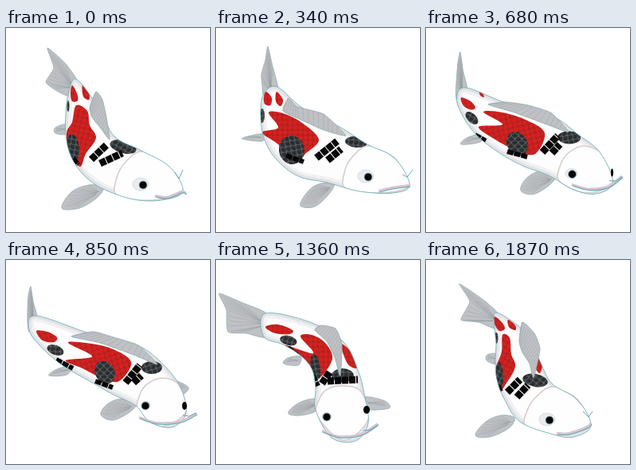
These frames come from a looping animation (256 px wide and 256 px high, 2040 ms). An HTML page:

```html
<!DOCTYPE html>
<html lang="en">
<head>
<meta charset="utf-8">
<title>Koi</title>
<style>
html, body { margin: 0; width: 100%; height: 100%; overflow: hidden; background: #fff; }
svg { display: block; width: 100vw; height: 100vh; }
path { stroke-linejoin: round; }
.line { fill: none; }
</style>
</head>
<body>
<svg id="stage" viewBox="0 0 256 256">
  <defs>
    <clipPath id="skin"><path id="skinPath"/></clipPath>
    <pattern id="redNet" width="9" height="9" patternUnits="userSpaceOnUse">
      <rect width="9" height="9" fill="#d5211f"/>
      <path d="M0 0Q1 4.5 4.5 4.5Q8 4.5 9 0M-4.5 4.5Q-3.5 9 0 9Q3.5 9 4.5 4.5Q5.5 9 9 9" fill="none" stroke="#86201f" stroke-width=".7"/>
    </pattern>
    <pattern id="darkNet" width="9" height="9" patternUnits="userSpaceOnUse">
      <rect width="9" height="9" fill="#2b2e30"/>
      <path d="M0 0Q1 4.5 4.5 4.5Q8 4.5 9 0M-4.5 4.5Q-3.5 9 0 9Q3.5 9 4.5 4.5Q5.5 9 9 9" fill="none" stroke="#73787a" stroke-width=".8"/>
    </pattern>
  </defs>
</svg>
<script>
const STEP = 170, COUNT = 12;
const KEYS = [0, 2, 3, 5, 6, 8, 11];

// Each part has one row of x y pairs per key pose.
const rows = text => text.trim().split('\n').map(r => r.trim().split(/\s+/).map(Number));
const parts = {
  left: rows(`78 84 75 108 75 135 82 162 98 185 122 202 160 215
    60 82 56 108 60 138 75 164 103 186 140 194 180 205
    48 88 48 112 57 138 80 162 112 179 145 187 190 203
    29 88 45 110 72 133 105 152 133 168 163 183 180 203
    35 90 57 112 85 130 112 147 135 163 150 180 165 210
    60 96 84 106 105 119 120 136 125 160 125 188 145 223
    86 84 88 105 87 128 89 150 98 174 118 203 160 219`),
  right: rows(`195 216 222 205 205 174 168 153 136 136 116 100 88 64
    222 207 243 197 224 163 190 146 155 124 108 100 77 74
    220 206 243 195 218 153 186 137 150 113 100 98 63 80
    208 210 226 192 219 160 198 132 165 107 105 92 38 70
    190 215 212 195 208 160 190 128 160 105 100 87 37 72
    175 227 191 205 186 168 178 138 160 103 118 78 62 67
    185 222 207 208 190 175 158 155 142 125 126 92 89 66`),
  tail: rows(`89 66 74 44 52 25 60 50 50 68 64 79 79 85
    78 78 71 48 65 23 62 40 57 58 58 72 60 84
    64 82 59 55 55 27 52 42 50 60 48 76 48 90
    39 72 34 52 31 33 28 44 27 62 27 78 29 90
    39 73 28 52 18 36 17 58 14 86 24 88 37 92
    63 67 34 54 4 42 13 62 15 90 38 92 63 97
    90 67 72 50 42 30 55 52 44 75 66 78 87 86`),
  dorsal: rows(`105 100 113 80 121 90 126 112 130 140 119 126 108 112
    84 104 91 88 102 99 135 108 163 135 135 128 104 114
    74 96 92 96 122 97 148 106 168 130 140 122 104 108
    82 96 110 90 135 97 166 107 190 131 160 119 118 104
    118 94 127 84 146 94 176 102 193 135 172 118 144 104
    124 88 132 82 150 86 158 106 156 146 149 122 139 102
    117 102 121 78 136 92 143 112 135 148 130 130 121 116`),
  pectoral: rows(`122 200 104 197 82 206 70 226 92 226 114 213
    148 194 126 197 113 208 106 223 124 224 142 208
    162 190 140 186 124 197 119 214 136 216 155 203
    163 180 145 174 127 181 119 194 134 201 155 191
    151 176 133 173 116 180 110 191 126 195 146 190
    128 175 112 176 97 184 91 193 106 195 126 189
    111 198 94 195 75 203 62 220 80 222 104 211`),
  pelvic: rows(`76 121 62 125 62 132 76 133
    59 133 44 135 33 139 58 142
    60 133 40 138 34 147 60 142
    82 133 64 137 54 145 76 144
    92 132 74 134 65 141 86 143
    106 121 90 123 85 130 103 132
    88 118 77 119 76 126 87 130`),
  farFin: rows(`185 178 190 178 192 184 185 184
    210 175 215 175 216 180 210 180
    210 172 216 172 217 178 210 178
    208 152 222 155 229 162 215 172
    203 157 230 155 232 169 210 174
    187 172 212 177 217 186 189 187
    165 180 170 180 172 185 165 185`),
  head: rows(`140 211 139 188 151 167 172 155 206 174 222 204 185 216
    163 201 161 182 170 163 192 148 226 165 243 197 205 207
    169 195 169 176 180 158 200 148 227 161 243 194 210 205
    166 190 168 169 178 155 198 148 218 158 226 190 195 209
    152 190 154 170 164 155 184 150 205 158 213 190 180 215
    127 196 130 174 140 162 160 158 182 165 191 200 160 226
    126 209 127 189 139 171 160 159 190 176 207 207 165 220`),
  redBig: rows(`88 97 102 104 105 122 113 138 100 158 93 174 80 158 76 132 83 118
    66 106 84 107 108 119 129 140 112 158 100 168 78 146 58 131 78 125
    66 107 92 108 122 121 141 136 132 164 108 160 78 144 57 122 84 121
    78 104 100 104 132 111 157 128 142 152 120 148 96 136 75 126 108 121
    91 101 108 98 138 104 158 124 143 150 124 144 100 134 70 118 110 121
    106 96 120 94 137 104 146 124 130 148 121 138 108 122 87 107 122 117
    96 94 105 98 107 118 112 134 100 156 92 165 88 150 89 132 95 115`),
  redTail: rows(`83 72 89 82 90 91 83 92 81 82
    63 80 70 88 68 97 61 95 60 86
    50 86 60 94 60 103 52 102 48 94
    38 89 52 90 64 97 60 103 46 101
    43 90 58 87 75 94 71 99 53 98
    62 84 78 81 96 88 92 93 74 92
    86 71 95 78 99 86 92 89 86 80`),
  redBack: rows(`96 72 104 82 104 90 97 86
    76 80 84 90 81 98 75 92
    64 83 73 91 74 97 66 93
    70 75 71 76 71 77 70 76
    80 73 81 74 81 75 80 74
    95 65 96 66 96 67 95 66
    103 75 112 82 112 88 104 84`),
  redFar: rows(`137 118 140 122 142 128 138 124
    200 100 202 102 202 104 200 102
    200 100 202 102 202 104 200 102
    200 100 202 102 202 104 200 102
    192 110 199 117 201 124 194 117
    157 106 170 116 177 135 165 130
    139 118 146 128 143 142 137 134`),
  scales: rows(`107 165 126 147 118 170 146 157
    126 163 152 142 140 166 157 152
    142 158 163 138 156 160 166 147
    150 154 168 132 160 154 170 145
    149 152 160 132 154 155 164 143
    133 155 143 140 140 152 178 150
    102 166 118 150 114 172 128 157`),
  belly: rows(`84 164 91 171 70 140 70 140
    88 160 110 168 50 140 50 140
    92 158 122 164 60 143 66 147
    112 152 134 160 63 125 84 136
    118 149 138 158 70 121 86 130
    122 145 128 158 90 110 104 121
    90 158 94 165 78 135 78 135`),
  lips: rows(`188 212 203 214 221 207 227 209
    205 206 217 203 236 200 244 199
    200 197 218 201 238 197 254 181
    168 199 190 206 220 204 240 194
    153 206 172 210 200 210 224 203
    134 216 155 223 183 220 204 207
    165 219 180 219 203 211 208 206`),
  barbel: rows(`212 181 217 189 222 178
    234 184 240 187 247 178
    238 188 246 188 254 181
    222 195 230 196 239 192
    205 206 214 207 222 203
    185 214 194 213 203 207
    197 190 204 197 209 190`),
  // cx cy rx ry angle
  spotTail: rows(`78 98 7 1.5 90
    58 110 9 3 90
    53 113 9 5 70
    62 113 11 6 20
    73 108 13 5 15
    91 101 11 6 15
    88 98 7 2.5 90`),
  spotSide: rows(`84 151 18 8 85
    95 153 18 16 80
    105 150 17 13 60
    124 141 15 12 60
    130 137 15 10 65
    125 134 16 6 80
    92 146 18 5 88`),
  spotNape: rows(`147 149 17 8 15
    176 143 14 7 5
    176 140 16 8 5
    183 135 13 8 0
    178 137 13 9 5
    159 145 14 9 0
    137 151 16 8 10`),
  // x y and socket radius
  eye: rows(`172 197 10
    191 187 10
    192 184 9
    175 183 6
    158 184 6
    139 197 6
    155 201 10`),
  // x y and visible width
  farEye: rows(`222 190 0
    243 182 0
    243 180 0
    224 183 3
    211 182 4
    189 188 4
    205 193 0`),
  turn: rows(`60
    45
    35
    28
    30
    45
    75`)
};

const svg = document.getElementById('stage');
function add(tag, attrs, parent = svg) {
  const el = document.createElementNS('http://www.w3.org/2000/svg', tag);
  set(el, attrs);
  return parent.appendChild(el);
}
function set(el, attrs) {
  for (const k in attrs) el.setAttribute(k, attrs[k]);
}
const TEAL = '#62a9b0';
const finStyle = { fill: '#bfc1c5', stroke: '#8fabb0', 'stroke-width': .8 };
const rayStyle = { class: 'line', stroke: '#8e9397', 'stroke-width': .45, opacity: .75 };
const fin = () => ({ shape: add('path', finStyle), rays: add('path', rayStyle) });

const fins = { farFin: fin(), pelvic: fin(), pectoral: fin(), tail: fin() };
const body = add('path', { fill: '#fdfdfd' });
const coat = add('g', { 'clip-path': 'url(#skin)' });
const shade = [[14, .25], [7, .35]].map(([w, o]) =>
  add('path', { class: 'line', stroke: '#c9c5cf', 'stroke-width': w, opacity: o }, coat));
const reds = ['redBig', 'redTail', 'redBack', 'redFar'].map(name =>
  [name, add('path', { fill: 'url(#redNet)' }, coat)]);
const spots = ['spotTail', 'spotSide', 'spotNape'].map(name =>
  [name, add('ellipse', { fill: 'url(#darkNet)' }, coat)]);
const dashes = { class: 'line', stroke: '#080808', 'stroke-dasharray': '8 1' };
const scales = add('path', { ...dashes, 'stroke-width': 9 }, coat);
const belly = add('path', { ...dashes, 'stroke-width': 6 }, coat);
const head = add('path', { fill: '#fefefe', stroke: '#d8cccf', 'stroke-width': 1.6 }, coat);
const outline = add('path', { class: 'line', stroke: TEAL, 'stroke-width': .8 });
fins.dorsal = fin();
const socket = add('ellipse', { fill: '#e9ebee', stroke: '#d2d6da', 'stroke-width': .7 });
const eye = add('circle', { r: 5, fill: '#060606', stroke: '#9bb9c2', 'stroke-width': .8 });
const farEye = add('ellipse', { ry: 5, fill: '#060606' });
const mouth = add('path', { class: 'line', stroke: '#d9c3d2', 'stroke-width': 3.2 });
const lips = add('path', { class: 'line', stroke: TEAL, 'stroke-width': 1.1 });
const barbel = add('path', { class: 'line', stroke: TEAL, 'stroke-width': 1 });

const points = a => Array.from({ length: a.length / 2 }, (_, i) => [a[2 * i], a[2 * i + 1]]);
const mix = (a, b, t) => a.map((v, i) => v + (b[i] - v) * t);
const polyline = p => 'M' + p.map(q => q.join(' ')).join('L');
const pairs = p => polyline(p.slice(0, 2)) + polyline(p.slice(2));

// Smooth path through points; k sets how round it is.
function spline(p, k = 1 / 6, closed = true) {
  const n = p.length;
  const at = i => closed ? p[(i + n) % n] : p[Math.max(0, Math.min(n - 1, i))];
  let d = 'M' + p[0].join(' ');
  for (let i = 0; i < (closed ? n : n - 1); i++) {
    const [a, b, c, e] = [-1, 0, 1, 2].map(j => at(i + j));
    const h1 = b.map((v, j) => v + (c[j] - a[j]) * k);
    const h2 = c.map((v, j) => v - (e[j] - b[j]) * k);
    d += `C${h1.join(' ')} ${h2.join(' ')} ${c.join(' ')}`;
  }
  return d + (closed ? 'Z' : '');
}

function fanRays(p) {
  const root = mix(p[0], p[p.length - 1], .5);
  let d = '';
  for (let i = 1; i < p.length - 2; i++)
    for (let t = 0; t < 1; t += .25)
      d += polyline([mix(root, p[i], .1), mix(root, mix(p[i], p[i + 1], t), .93)]);
  return d;
}

function ladderRays(p) {
  const edge = [p[1], p[2], p[3], p[4]], base = [p[0], p[6], p[5], p[4]];
  let d = '';
  for (let i = 0; i < 3; i++)
    for (let t = 0; t < 1; t += .2)
      d += polyline([mix(base[i], base[i + 1], t), mix(edge[i], edge[i + 1], t)]);
  return d;
}

function poseAt(step) {
  let i = KEYS.length - 1;
  while (KEYS[i] > step) i--;
  const j = (i + 1) % KEYS.length;
  const end = j ? KEYS[j] : COUNT;
  const t = (step - KEYS[i]) / (end - KEYS[i]);
  const pose = {};
  for (const name in parts) pose[name] = mix(parts[name][i], parts[name][j], t);
  return pose;
}

function draw(step) {
  const pose = poseAt(step);
  const pts = name => points(pose[name]);
  const skin = spline([...pts('left'), ...pts('right')]);
  for (const el of [body, outline, ...shade, document.getElementById('skinPath')])
    set(el, { d: skin });

  for (const name in fins) {
    const p = pts(name);
    const sharp = name === 'tail' || name === 'dorsal';
    set(fins[name].shape, { d: spline(p, sharp ? .09 : 1 / 6) });
    set(fins[name].rays, { d: name === 'dorsal' ? ladderRays(p) : fanRays(p) });
  }

  for (const id of ['redNet', 'darkNet'])
    set(document.getElementById(id), { patternTransform: `rotate(${pose.turn[0] - 90})` });
  for (const [name, el] of reds) set(el, { d: spline(pts(name)) });
  for (const [name, el] of spots) {
    const [cx, cy, rx, ry, a] = pose[name];
    set(el, { cx, cy, rx, ry, transform: `rotate(${a} ${cx} ${cy})` });
  }
  set(scales, { d: pairs(pts('scales')) });
  set(belly, { d: pairs(pts('belly')) });
  set(head, { d: spline(pts('head')) });

  const [x, y, r] = pose.eye;
  set(socket, { cx: x - (r - 6) * .8, cy: y - 1, rx: r, ry: r * .8 });
  set(eye, { cx: x, cy: y });
  const [fx, fy, fr] = pose.farEye;
  set(farEye, { cx: fx, cy: fy, rx: fr });

  const lip = spline(pts('lips'), 1 / 6, false);
  set(lips, { d: lip });
  set(mouth, { d: lip, transform: 'translate(-1 -1.5)' });
  set(barbel, { d: polyline(pts('barbel')) });
}

const start = performance.now();
let shown = -1;
function tick() {
  const step = Math.floor((performance.now() - start) / STEP) % COUNT;
  if (step !== shown) draw(shown = step);
  requestAnimationFrame(tick);
}
tick();
</script>
</body>
</html>
```
